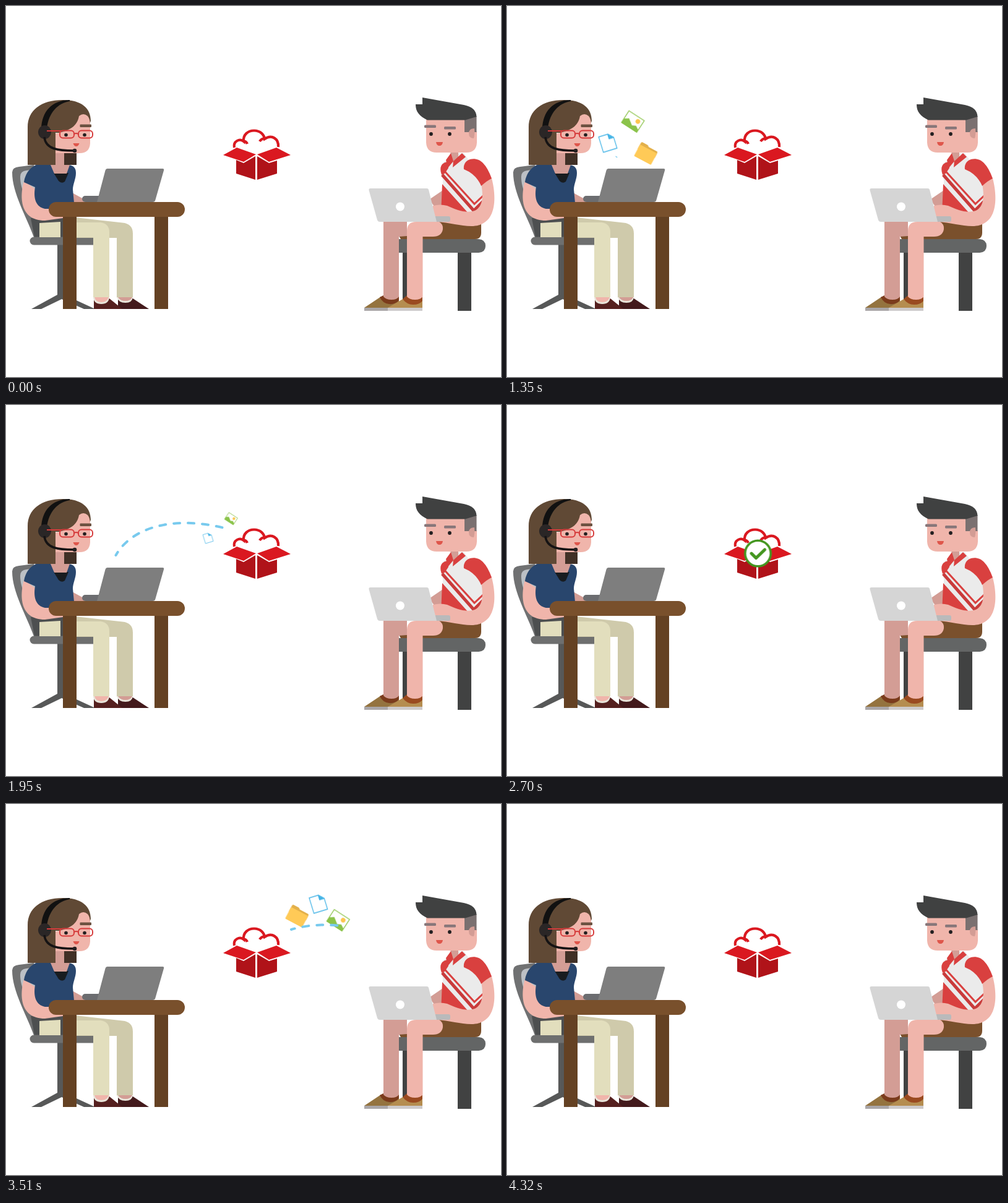
These frames come from a looping animation (800x600 px, 4.5 s). An HTML page:

```html
<!DOCTYPE html>
<html lang="en">
<head>
<meta charset="utf-8">
<title>File transfer</title>
<style>
html, body { margin: 0; width: 100%; height: 100%; overflow: hidden; background: #fff; }
svg { display: block; width: 800px; height: 600px; }
.skin { fill: #f0b5ab; }
.shade { fill: #d39d95; }
.red { fill: #d9403f; }
.ink { fill: #231f20; }
.line { fill: none; }

/* every part shares the 4.5 s loop */
.send, .receive, .out, .in, .tick, .reveal { animation: 4.5s linear infinite; }

.send { animation-name: send; }
@keyframes send {
  0%, 29.3% { transform: translate(0, 0) scale(1); }
  31.5% { transform: translate(6px, -2px) scale(1); }
  36% { transform: translate(65px, -16px) scale(1); }
  40% { transform: translate(131px, -14px) scale(.96); }
  43.3% { transform: translate(178px, 11px) scale(.92); }
  47%, 100% { transform: translate(211px, 34px) scale(.9); }
}
.out { animation-name: out; }
@keyframes out {
  0%, 4.67% { transform: translate(200px, 266px) rotate(var(--r)) scale(0); animation-timing-function: ease-out; }
  14.5%, 33.5% { transform: translate(var(--x), var(--y)) rotate(var(--r)) scale(1); }
  40% { transform: translate(var(--x), var(--y)) rotate(var(--r)) scale(.83); }
  43.3% { transform: translate(var(--x), var(--y)) rotate(var(--r)) scale(.63); }
  47%, 100% { transform: translate(var(--x), var(--y)) rotate(var(--r)) scale(0); }
}
.lead { animation-name: lead; }
@keyframes lead {
  0%, 4.67% { transform: translate(200px, 266px) rotate(var(--r)) scale(0); animation-timing-function: ease-out; }
  14.5%, 32% { transform: translate(var(--x), var(--y)) rotate(var(--r)) scale(1); }
  39% { transform: translate(var(--x), var(--y)) rotate(var(--r)) scale(.5); }
  42.5%, 100% { transform: translate(var(--x), var(--y)) rotate(var(--r)) scale(0); }
}

.receive { animation-name: receive; }
@keyframes receive {
  0%, 65.5% { transform: translate(-19px, 2px); }
  70.67% { transform: translate(0, 0); }
  73.5% { transform: translate(24px, -4px); }
  76.3% { transform: translate(61px, -5px); }
  80.5% { transform: translate(124px, 6px); }
  85.33% { transform: translate(181px, 32px); }
  88.3%, 100% { transform: translate(199px, 40px); }
}
.in { animation-name: in; }
@keyframes in {
  0%, 62% { transform: translate(424px, 222px) rotate(var(--r)) scale(0); animation-timing-function: ease-out; }
  66.5%, 88% { transform: translate(var(--x), var(--y)) rotate(var(--r)) scale(1); }
  95%, 100% { transform: translate(436px, 238px) rotate(var(--r)) scale(0); }
}

.tick { animation-name: tick; }
@keyframes tick {
  0%, 55.5% { transform: translate(405.5px, 240px) scale(0); }
  60% { transform: translate(405.5px, 240px) scale(1); }
  62% { transform: translate(405.5px, 240px) scale(1.14); }
  65% { transform: translate(405.5px, 240px) scale(1.06); }
  70.67% { transform: translate(405.5px, 240px) scale(.73); }
  75.5%, 100% { transform: translate(405.5px, 240px) scale(0); }
}

/* a mask stroke uncovers each dashed arc, then runs off its far end */
.reveal { stroke: #fff; stroke-width: 12; fill: none; stroke-dasharray: 100 300; }
#m1 .reveal { animation-name: arc1; }
#m2 .reveal { animation-name: arc2; }
@keyframes arc1 {
  0%, 29.9% { stroke-dashoffset: 100; }
  43%, 47% { stroke-dashoffset: 0; }
  57.5%, 100% { stroke-dashoffset: -100; }
}
@keyframes arc2 {
  0%, 71.5% { stroke-dashoffset: 100; }
  85.6%, 88% { stroke-dashoffset: 0; }
  95.6%, 100% { stroke-dashoffset: -100; }
}
.dash { fill: none; stroke: #78caee; stroke-width: 4; stroke-linecap: round; stroke-dasharray: 10 13; stroke-dashoffset: 4; }
</style>
</head>
<body>
<svg viewBox="0 0 800 600">
<defs>
  <path id="a1" pathLength="100" d="M176 245C205 195 275 180 353 199"/>
  <path id="a2" pathLength="100" d="M458 203.500C515 187 592 195 631 245"/>
  <mask id="m1" maskUnits="userSpaceOnUse" x="0" y="0" width="800" height="600"><use href="#a1" class="reveal"/></mask>
  <mask id="m2" maskUnits="userSpaceOnUse" x="0" y="0" width="800" height="600"><use href="#a2" class="reveal"/></mask>
  <g id="doc">
    <path d="M-11.500 -13H4L11.500 -5.500V13H-11.500Z" fill="#fff" stroke="#45b4e6" stroke-width="1.300"/>
    <path d="M3 -13.500L12 -4.500H3Z" fill="#45b4e6"/>
  </g>
  <g id="photo">
    <path d="M-14.700 -11.200H14.700V11.200H-14.700Z" fill="#fff" stroke="#8bc34a" stroke-width="1.300"/>
    <path d="M-15 12V4L-8 -1L2 6L8 3L15 7V12Z" fill="#8bc34a"/>
    <circle cx="6.700" cy="-4.400" r="3.800" fill="#fcc64f"/>
  </g>
  <g id="folder">
    <path d="M-15.500 -11Q-15.500 -13 -13.500 -13H-4L-1 -11H13.500Q15.500 -11 15.500 -9V0H-15.500Z" fill="#e3b04a"/>
    <rect x="-15.500" y="-8" width="31" height="21" rx="1.500" fill="#ffca57"/>
  </g>
</defs>

<!-- woman: chair -->
<path d="M10 269Q10 261 21 260L45 257L56 374H45C33 340 10 303 10 269Z" fill="#707172"/>
<path d="M23 276Q23 267 33 266L48 264V330C34 316 23 297 23 276Z" fill="#bcc0c5"/>
<path d="M40 343H92V374H46Z" fill="#4d4f50"/>
<path d="M83 386H92V466L144 490H126L90 474L57 490H41L83 467Z" fill="#575858"/>
<rect x="38.500" y="373.500" width="115" height="13" rx="6.500" fill="#6e6f6f"/>

<!-- woman: legs -->
<path d="M112 342L188 350.500Q205 352 205 368V471H179V375H112Z" fill="#cfcaab"/>
<path d="M54 351L88 349V374H54ZM112 350H153Q167 352 167 366V471H141V374H112Z" fill="#e2debd"/>
<path d="M181 474L205 473L231 490H181Z" fill="#431a1c"/>
<path d="M142 474L167 473L188 490H142Z" fill="#55201f"/>
<path d="M141 471H167Q166 482 154 482T141 471ZM179 471H205Q204 480 193 480T179 471Z" fill="#e9e5da"/>
<path d="M143 471H166Q163 479 154 479T143 471Z" class="skin"/>
<path d="M181 471H204Q201 477 193 477T181 471Z" class="shade"/>

<!-- woman: body -->
<path d="M94 236H114V257H94Z" fill="#403026"/>
<path d="M29 283C22 308 22 347 63 347L92 343V317L47 296Z" class="skin"/>
<path d="M105 301L127 313V318H105Z" class="shade"/>
<path d="M29 285C32 267 43 256 58 255L76 257L90 270L101 257Q113 258 113 270C113 280 108 288 108 297L110 318H76V328H63C48 325 44 311 47 293Z" fill="#29466d"/>
<path d="M77 270H101L95 284Q90 288 85 283Z" fill="#181c20"/>
<path d="M80 236H94V257H103L98 271H78L72 257H80Z" class="shade"/>

<!-- woman: head -->
<path d="M35 257V196C35 169 56 152 92 152C122 152 137 165 137 186L129 205H80V257Z" fill="#604935"/>
<path d="M80 206C104 202 115 194 118 178Q125 172 132 178Q136 183 136 192V222Q135 238 119 238H80Z" class="skin"/>
<path d="M57 198C58 171 74 152 103 152V154C84 157 69 172 66 198Z" fill="#111"/>
<ellipse cx="62.500" cy="204" rx="10.500" ry="11" fill="#2a2626"/>
<path d="M62 212C64 232 85 234 110 234" class="line" stroke="#151314" stroke-width="3.500"/>
<circle cx="111" cy="234" r="3.300" class="ink"/>
<rect x="119.500" y="191.500" width="18.500" height="4.500" rx="1" fill="#6b5140"/>
<circle cx="97" cy="208.500" r="2.800" class="ink"/>
<circle cx="127" cy="208.500" r="2.800" class="ink"/>
<g class="line" stroke="#d63c3c" stroke-width="2">
  <path d="M66 202H90M110 207Q113 205 117 207"/>
  <rect x="87" y="201.500" width="23" height="12" rx="5"/>
  <rect x="117" y="201.500" width="23" height="12" rx="5"/>
</g>
<path d="M108.500 222H118.500Q117 227 113.500 227T108.500 222Z" fill="#df564b"/>

<!-- woman: desk -->
<rect x="123" y="307" width="35" height="10" rx="5" fill="#6c6d70"/>
<path d="M164 263H253Q256 263 255 266L241 315Q240 317 237 317H147L160.500 266Q161.500 263 164 263Z" fill="#7e7e7e"/>
<path d="M92 340H114V490H92ZM240 340H262V490H240Z" fill="#644123"/>
<rect x="69" y="317" width="220" height="24" rx="12" fill="#79502c"/>

<!-- man: stool and legs -->
<path d="M641 398H648V475H641ZM730 398H752V493H730Z" fill="#414242"/>
<path d="M635 377H764Q775 378 775 388T764 399H635Z" fill="#636565"/>
<path d="M692 349H768V367Q768 377 758 377H638L634 370Z" fill="#7a502c"/>
<path d="M579 488L606 470H635V488Z" fill="#94733f"/>
<path d="M617 488L648 470H673V488Z" fill="#b58d50"/>
<path d="M579 488H617V493H579Z" fill="#aaa6a8"/>
<path d="M617 488H673V493H617Z" fill="#cdcacb"/>
<path d="M604 471L610 468H635V476Q629 483 619 482T604 471Z" fill="#7b3b1c"/>
<path d="M641 474L648 468H673V477Q668 483 658 483T641 474Z" fill="#9a4a20"/>
<path d="M610 349H648V372L635 373V470Q632 475 623 475T610 470Z" class="shade"/>
<path d="M648 364Q648 349 663 349H700Q707 353 706 361Q704 373 690 373H673.500V470Q670 475 661 475T648 470Z" class="skin"/>

<!-- man: body -->
<path d="M706 298L684 313L692 324H708Z" class="shade"/>
<path d="M702 266Q702 254 713 249L722 238H740L770 280L772 310L769 333Q755 337 730 335H704L706 282Z" fill="#ebebeb"/>
<path d="M705 288L748 336H703Z" class="red"/>
<path d="M704 273Q698 255 713 252L715 262L709 271Z" class="red"/>
<path d="M705 263L757 320L771 307" class="line" stroke="#d9403f" stroke-width="3"/>
<path d="M705 273L756 331L771 316" class="line" stroke="#c93b3b" stroke-width="5"/>
<path d="M718 236H731V248L723 255Z" class="shade"/>
<path d="M719 238L711 249L714 262L723 251ZM737 238L743 244L722 261L723 251Z" class="red"/>
<path d="M785 279C792 305 796 356 752 356C734 356 718 350 694 349L688 330L690 323Q702 320 713 323C726 329 741 335 754 332C768 329 773 314 768 288Z" class="skin"/>
<path d="M740 264C738 250 753 243 766 250Q777 257 785 279Q778 282 768 291Q760 272 740 264Z" class="red"/>

<!-- man: head -->
<path d="M679 183H742V203H761V221Q760 237 744 237H696Q680 237 679 221Z" class="skin"/>
<path d="M741 183L760.500 178V204H741Z" fill="#7a7070"/>
<path d="M757 198Q748 198 748 206T756 214Q758 208 757 198Z" class="shade"/>
<path d="M662 159H673V148L740 160Q760 164 760.500 179L742 184.500H681C668 178 662 171 662 159Z" fill="#404141"/>
<rect x="676" y="192.500" width="19" height="4.500" rx="1.500" fill="#88777a"/>
<rect x="708" y="195" width="19" height="4.500" rx="1.500" fill="#88777a"/>
<circle cx="687" cy="207" r="2.900" class="ink"/>
<circle cx="717" cy="207" r="2.900" class="ink"/>
<path d="M695 220H706Q705 226 700.500 226T695 220Z" fill="#df564b"/>

<!-- man: laptop -->
<path d="M690 340H715Q718 340 718 343V346Q718 349 715 349H690Z" fill="#b9babb"/>
<path d="M589 295H680Q682.500 295 683 297L696 349H604Q601 349 600 346L586.500 298Q586 295 589 295Z" fill="#d5d5d5"/>
<circle cx="637" cy="324.500" r="7" fill="#fff"/>

<!-- box with cloud -->
<path d="M369 229C367 218 378 214 384 219C383 208 391 201.500 401 201.500C411 201.500 417 208 418 215C430 207 441 215 440 228M382 218Q388 218 390 223M418 214Q412 215 410 219" class="line" stroke="#da1820" stroke-width="4.200"/>
<path d="M351 241L373 229L404 240L384 252ZM406 240L437 229L460 241L425 252Z" fill="#da1820"/>
<path d="M372 249L384 254L403 243V281L372 271ZM406 243L425 254L438 250V271L406 281Z" fill="#b01319"/>

<g class="tick">
  <circle r="20.700" fill="#fff" stroke="#43961f" stroke-width="3.600"/>
  <path d="M-10.500 0L-3 7.500L11 -6" class="line" stroke="#43961f" stroke-width="5" stroke-linecap="round" stroke-linejoin="round"/>
</g>

<g class="send">
  <use href="#folder" class="out lead" style="--x:223px;--y:239px;--r:28deg"/>
  <use href="#doc" class="out" style="--x:161px;--y:221.500px;--r:-17deg"/>
  <use href="#photo" class="out" style="--x:201.500px;--y:187.500px;--r:33deg"/>
</g>
<g class="receive">
  <use href="#folder" class="in" style="--x:384px;--y:181.500px;--r:28deg"/>
  <use href="#doc" class="in" style="--x:418px;--y:161.500px;--r:-17deg"/>
  <use href="#photo" class="in" style="--x:450px;--y:188.500px;--r:33deg"/>
</g>

<g mask="url(#m1)"><path class="dash" d="M177.500 243C205 195 275 180 351 198.500"/></g>
<g mask="url(#m2)"><path class="dash" d="M461 203C515 187 592 195 630 243"/></g>
</svg>
</body>
</html>
```
